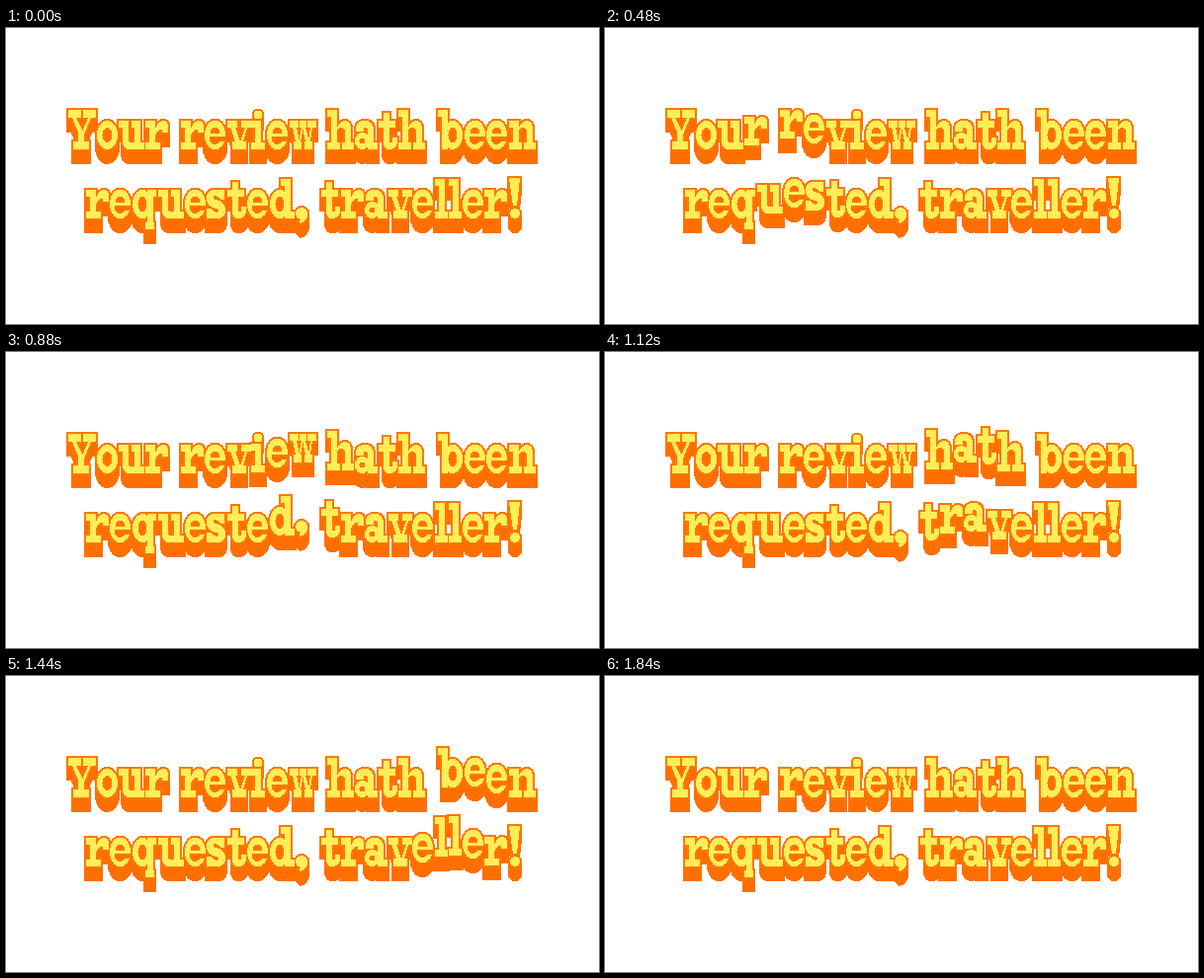
Animation of 600 by 300 pixels, one loop 3200 ms. Source, as an HTML page:

```html
<!DOCTYPE html>
<html lang="en">
<head>
<meta charset="utf-8">
<title>Your review hath been requested, traveller!</title>
<style>
  html, body { margin: 0; width: 100%; height: 100%; overflow: hidden; background: #fff; }
  svg { display: block; width: 600px; height: 300px; }
  .block { fill: #ff6f00; stroke: #ff6f00; stroke-width: 4; }
  .rim { fill: #ff780a; stroke: #ff780a; stroke-width: 4; }
  .face { fill: #ffee58; }
</style>
</head>
<body>
<svg viewBox="0 0 600 300" shape-rendering="crispEdges" role="img"
     aria-label="Your review hath been requested, traveller!">
  <defs></defs>
  <g id="blocks"></g>
  <g id="faces"></g>
</svg>
<script>
const LOOP = 3200, STEP = 80, WAVE_END = 1840;
const DEPTH = 13, LIFT = 11.5, REACH = 0.115;
const LINES = [
  { text: 'Your review hath been', x: 61, y: 123, width: 479 },
  { text: 'requested, traveller!', x: 79, y: 193, width: 443 }
];

// Slab lettering with heavy heads and feet: baseline at y = 0, x-height 29, ascender 40.
const box = (x, y, w, h) => `M${x} ${y}h${w}v${h}h${-w}z`;
const oval = (cx, cy, rx, ry, sweep = 1) =>
  `M${cx - rx} ${cy}a${rx} ${ry} 0 0 ${sweep} ${2 * rx} 0a${rx} ${ry} 0 0 ${sweep} ${-2 * rx} 0z`;
const ring = (cx, cy, rx, ry, holeX, holeY) =>
  oval(cx, cy, rx, ry) + oval(cx, cy, holeX, holeY, 0);
const bowl = cx => ring(cx, -14.5, 10, 14.5, 4.5, 7.5);
const post = (top, foot) => box(0, -top, 10, 7) + box(4, -top, 6, top) + box(0, -7, foot, 7);
const arch = 'M10 -22Q13 -29 18 -29Q24 -29 24 -20V0H18V-18Q18 -22 14 -22Q10 -22 10 -17z' +
  box(15, -7, 12, 7);

// character: [advance, outline]
const GLYPHS = {
  Y: [29, box(0, -40, 13, 8) + box(15, -40, 13, 8) + box(10, -17, 6, 17) + box(5, -8, 16, 8) +
    'M4 -32H8L15 -18V-15H11zM20 -32H23L16 -15H13z'],
  o: [22, ring(10.5, -14.5, 10.5, 14.5, 5, 7.5)],
  u: [27, box(0, -29, 10, 7) + box(13, -29, 9, 7) + box(16, -29, 6, 29) + box(16, -7, 10, 7) +
    'M4 -22H10V-9Q10 -7 13 -7H16V0H11Q4 0 4 -9z'],
  r: [24, post(29, 15) + 'M10 -21Q13 -29 18 -29Q23 -29 23 -23V-17H17V-20Q13 -21 10 -14z'],
  e: [22.5, 'M21 -13V-15A10.5 14.5 0 0 0 0 -15A10.5 14.5 0 0 0 20 -8H15A5 5 0 0 1 5.5 -13z' +
    'M5.5 -16A5 6.5 0 0 1 15.5 -16z'],
  v: [24.5, box(0, -29, 10, 7) + box(14, -29, 10, 7) + box(5, -8, 14, 8) +
    'M3 -22H8L13 -8H8zM18 -22H20L16 -8H13z'],
  i: [16, post(29, 14) + oval(7, -35, 4.5, 4.5)],
  w: [26.5, box(0, -29, 9, 7) + box(10, -29, 7, 7) + box(18, -29, 9, 7) +
    box(4, -8, 8, 8) + box(15, -8, 8, 8) +
    'M3 -22H7L10 -8H6zM12 -22H14L11 -8H9zM13 -22H16L20 -8H16zM21 -22H23L21 -8H19z'],
  h: [28, post(40, 13) + arch],
  n: [29, post(29, 13) + arch],
  a: [24, box(13, -20, 6, 20) + box(13, -7, 10, 7) + ring(7.5, -8.5, 7.5, 8.5, 3, 3) +
    'M1 -18V-22Q2 -29 10 -29Q19 -29 19 -20H13Q13 -23 9 -22V-18z'],
  t: [20, box(0, -29, 17, 7) + 'M5 -37H11V-7H14V-12H19V-7Q18 0 11 0Q5 0 5 -8z'],
  b: [26.5, box(0, -40, 10, 7) + box(4, -40, 6, 40) + bowl(15)],
  d: [26, bowl(10) + box(15, -40, 6, 40) + box(11, -40, 10, 7) + box(15, -7, 10, 7)],
  q: [26, bowl(10) + box(15, -29, 6, 40) + box(15, -29, 9, 7) + box(13, 4, 9, 7)],
  s: [21, 'M18 -29V-19H14Q12 -23 8 -23Q5 -21 9 -19Q19 -17 19 -9Q19 0 11 0H0V-10H5' +
    'Q7 -6 11 -6Q14 -9 9 -10Q0 -12 0 -20Q0 -29 8 -29z'],
  l: [14, post(40, 13)],
  ',': [14, oval(6, -5, 6, 6) + 'M12 -5Q12 3 5 5L3 3Q7 1 7 -1z'],
  '!': [14, 'M1 -41H12L9 -13H5z' + oval(7, -5, 5, 5)],
  ' ': [12, '']
};

function add(parent, tag, attrs) {
  const node = document.createElementNS('http://www.w3.org/2000/svg', tag);
  for (const key in attrs) node.setAttribute(key, attrs[key]);
  return parent.appendChild(node);
}

const defs = document.querySelector('defs');
for (const [char, [, d]] of Object.entries(GLYPHS)) {
  add(defs, 'path', { id: 'glyph' + char.charCodeAt(0), d });
}

const letters = [];
for (const line of LINES) {
  let x = line.x;
  for (const char of line.text) {
    const advance = GLYPHS[char][0];
    if (char !== ' ') {
      const href = '#glyph' + char.charCodeAt(0);
      const block = add(document.getElementById('blocks'), 'g', {});
      for (let y = DEPTH; y >= 0; y--) {
        add(block, 'use', { href, y, class: y ? 'block' : 'rim' });
      }
      const face = add(document.getElementById('faces'), 'use', { href, class: 'face' });
      const along = (x + advance / 2 + 1 - line.x) / line.width;
      letters.push({ parts: [block, face], x: Math.round(x) + 2, y: line.y, along });
    }
    x += advance;
  }
}

// A cosine bump runs along each line from 0 to 1 and dies down at the end.
function lift(along, time) {
  if (time < STEP || time >= WAVE_END) return 0;
  const distance = along - (0.5 + 0.000608 * (time - 880));
  if (Math.abs(distance) >= REACH) return 0;
  const fade = Math.min(1, (WAVE_END - time) / 320);
  return Math.round(LIFT * fade * Math.cos(distance / REACH * Math.PI / 2) ** 2);
}

function draw(now) {
  const time = Math.floor(now % LOOP / STEP) * STEP;
  for (const { parts, x, y, along } of letters) {
    const place = `translate(${x} ${y - lift(along, time)})`;
    for (const part of parts) part.setAttribute('transform', place);
  }
}

function tick() {
  draw(performance.now() - start);
  requestAnimationFrame(tick);
}

const start = performance.now();
tick();
</script>
</body>
</html>
```
